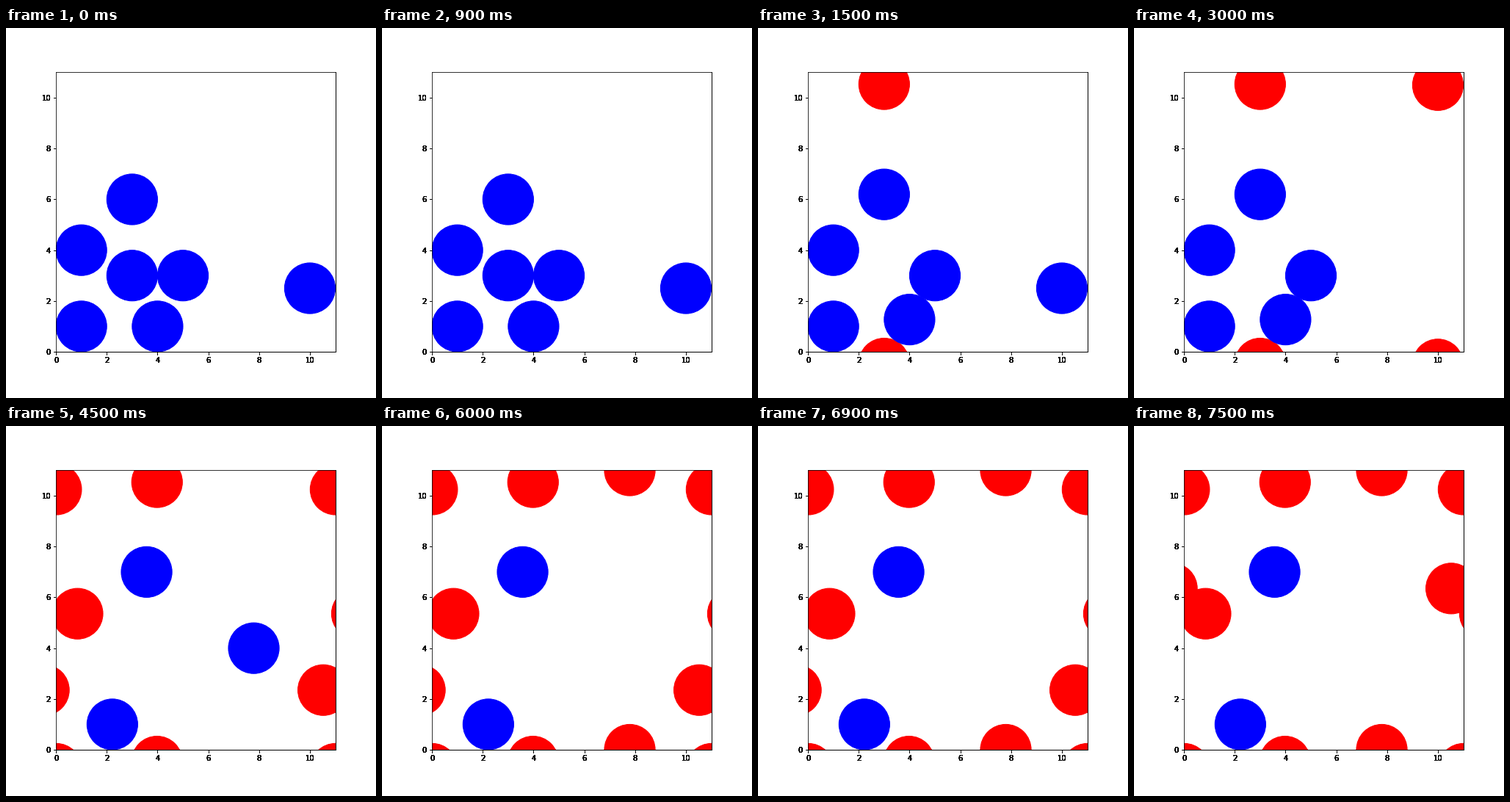
A matplotlib script for the animation above (8 s loop, 504 px wide and 504 px high).

```python
import matplotlib.pyplot as plt
from matplotlib.animation import FuncAnimation
from matplotlib.patches import Circle

SIZE = 11          # side of the periodic box
STEP_MS = 500
HOLD = 3           # ticks for which each configuration stays
LAYERS = 12        # stacked axes darken the antialiased labels

plt.rcParams["font.family"] = "DejaVu Sans"
plt.rcParams["font.size"] = 10


def shift(disks, index, dy):
    """Copy the configuration with one disk moved upwards by dy."""
    moved = list(disks)
    x, y = moved[index]
    moved[index] = (x, (y + dy) % SIZE)
    return moved


touch = 3 ** 0.5   # vertical gap of touching disks one unit apart
start = [(1, 1), (1, 4), (3, 3), (3, 6), (4, 1), (5, 3), (10, 2.5)]
chain = shift(start, 4, 2 - touch)
chain = shift(chain, 3, 8 - 2 * touch)
chain = shift(chain, 2, 2 * touch - 0.268)
later = [(2.22, 1), (0.85, 5.357), (3.57, 7), (3.98, 10.536),
         (7.79, 4), (10.525, 2.35), (0.01, 10.25)]
wrapped = shift(later, 4, 7)
states = [start, chain, shift(chain, 6, 8),
          later, wrapped, shift(wrapped, 5, 4)]


def make_axes():
    ax = fig.add_axes(slot)
    ax.set_aspect("equal")
    ax.set(xlim=(0, SIZE), ylim=(0, SIZE),
           xticks=range(0, SIZE, 2), yticks=range(0, SIZE, 2))
    return ax


def crosses(v):
    return v < 1 - 1e-9 or v > SIZE - 1 + 1e-9


def draw(tick):
    for patch in list(ax.patches):
        patch.remove()
    for x, y in states[tick // HOLD]:
        color = "red" if crosses(x) or crosses(y) else "blue"
        for dx in (-SIZE, 0, SIZE):
            for dy in (-SIZE, 0, SIZE):
                cx, cy = x + dx, y + dy
                if -1 < cx < SIZE + 1 and -1 < cy < SIZE + 1:
                    ax.add_patch(Circle((cx, cy), 1, color=color))
    return ax.patches


fig = plt.figure(figsize=(7, 7), dpi=72, facecolor="white")
slot = [0.135, 0.125, 0.755, 0.755]
for _ in range(LAYERS):
    ax = make_axes()

anim = FuncAnimation(fig, draw, frames=16, interval=STEP_MS,
                     init_func=lambda: draw(0), repeat=True, repeat_delay=0)
plt.show()
```
